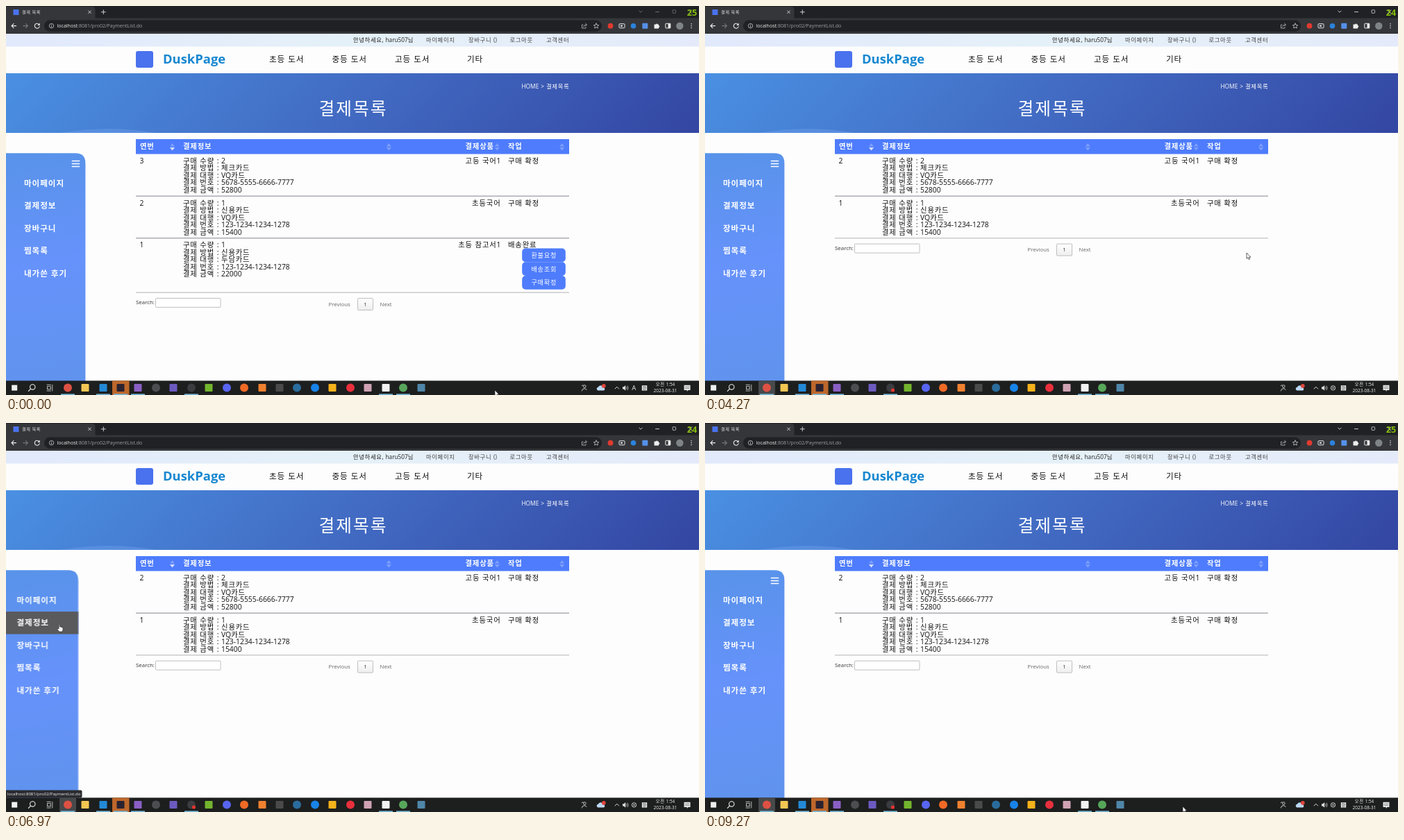
An HTML page for the animation above (9310 ms loop, 998 by 561 pixels).

```html
<!DOCTYPE html>
<html lang="ko">
<head>
<meta charset="utf-8">
<title>결제 목록</title>
<style>
html, body { margin: 0; width: 100%; height: 100%; overflow: hidden; background: #fdfdfd; }
svg { display: block; width: 100vw; height: 100vh; font-family: 'Open Sans', 'Noto Sans CJK KR', sans-serif; }
text { word-spacing: .09em; }
.k { font-family: 'Noto Sans CJK KR', sans-serif; letter-spacing: .08em; }
.line { fill: none; stroke-linecap: round; stroke-linejoin: round; }
.cursor { animation: move 9310ms linear infinite; }
.side { animation: slide 9310ms linear infinite; }
@keyframes move {
  0%, 5.9% { transform: translate(704px, 554px); }
  13.96%, 14.72% { transform: translate(771px, 422px); }
  20.41%, 25.78% { transform: translate(783px, 360px); }
  27.9%, 50.5% { transform: translate(780px, 356px); }
  61.2% { transform: translate(300px, 290px); }
  67.67%, 71% { transform: translate(100px, 285px); }
  78%, 82.17% { transform: translate(58px, 294px); }
  91.3% { transform: translate(268px, 88px); }
  98.3%, 100% { transform: translate(688px, 553px); }
}
@keyframes slide {
  0%, 67.13% { transform: none; }
  69.28%, 84.1% { transform: translate(-10.5px, 0); }
  86.25%, 100% { transform: none; }
}
</style>
</head>
<body>
<script>
const LOOP = 9310, CLICK = 1950, LOADED = 2400, ENTER = 6250, LEAVE = 7830;
const BLUE = '#4e7cfc';
const rules = new Map();

// Shows markup only between two times of the loop.
const on = (a, b, s) => {
  const id = `on${a}to${b}`, pc = t => (t / LOOP * 100).toFixed(3) + '%';
  rules.set(id, `@keyframes ${id}{0%{opacity:0}${pc(a)}{opacity:1}${pc(b)}{opacity:0}100%{opacity:0}}`);
  return `<g style="animation:${id} ${LOOP}ms step-end infinite">${s}</g>`;
};
const text = (x, y, size, s, fill = '#222', more = '') =>
  `<text x="${x}" y="${y}" font-size="${size}" fill="${fill}" ${more}>` +
  s.replace(/[가-힣]+/g, '<tspan class="k">$&</tspan>') + '</text>';
const rect = (x, y, w, h, fill, r = 0, more = '') =>
  `<rect x="${x}" y="${y}" width="${w}" height="${h}" rx="${r}" fill="${fill}" ${more}/>`;
const dot = (x, y, r, fill, more = '') => `<circle cx="${x}" cy="${y}" r="${r}" fill="${fill}" ${more}/>`;
const line = (d, color = '#ddd', w = 1) => `<path class="line" d="${d}" stroke="${color}" stroke-width="${w}"/>`;
const shape = (d, fill) => `<path d="${d}" fill="${fill}"/>`;
const MID = 'text-anchor="middle"', END = 'text-anchor="end"', BOLD = 'font-weight="700"';
const gradient = (id, box, stops) => `<linearGradient id="${id}" gradientUnits="userSpaceOnUse" ${box}>` +
  stops.map((c, i) => `<stop offset="${i / (stops.length - 1)}" stop-color="${c}"/>`).join('') + '</linearGradient>';

const defs = '<defs>' +
  gradient('top', 'x1="0" x2="998"', ['#e1e9fc', '#e5f1f8', '#e4eafa']) +
  gradient('banner', 'x1="228" y1="-131" x2="770" y2="411"', ['#4a90e2', '#426bc3', '#3346a2']) +
  gradient('menu', 'x1="0" y1="212" x2="60" y2="540"', ['#5893e9', '#6692fb', '#6093ee']) +
  gradient('page', 'x1="0" y1="421" x2="0" y2="439"', ['#ffffff', '#eeeeee']) +
  '<clipPath id="tab"><rect x="22" y="0" width="91" height="18"/></clipPath></defs>';

function browser() {
  const controls = c => line('M911.8 7L914 9.2 916.2 7M935.5 8.5H940.5', c, .9) +
    rect(960, 5.7, 4.6, 4.6, 'none', 1, `stroke="${c}" stroke-width=".8"`) +
    line('M982.8 5.8L988 11M988 5.8L982.8 11', c, .9);
  const reload = line('M47.6 26.6A3.5 3.5 0 1 0 48.2 29.6', '#e8e8e8', 1.1) + shape('M48.7 24.6V28H45.3Z', '#e8e8e8');
  const stop = line('M42 25.5L48 31.5M48 25.5L42 31.5', '#e8e8e8', 1.1);
  const title = text(23, 10.9, 6.2, '결제 목록', '#ddd');
  const mark = rect(10.5, 5, 8, 8, '#4a72ee');
  const globe = dot(14.5, 8.6, 3.7, '#8d9298');
  const loading = `<g clip-path="url(#tab)">${text(23, 10.9, 6.05, 'localhost:8081/pro02/PaymentList.do', '#ddd')}</g>`;
  return rect(0, 0, 998, 18, '#202124') + rect(0, 17.5, 998, 22.5, '#35363a') +
    shape('M0 18V1H124Q128.5 1 128.5 6V18Z', '#35363a') +
    on(0, CLICK, title + mark + reload + controls('#77797d')) +
    on(CLICK, LOOP, controls('#dadada')) +
    on(CLICK, LOADED, loading + globe + stop) +
    on(LOADED, LOOP, title + mark + reload) +
    line('M118.6 6.8L122.4 10.6M122.4 6.8L118.6 10.6M137.3 8.7H143.3M140.3 5.7V11.7', '#ddd', .9) +
    line('M14.6 28.6H8.2M11 25.6L8 28.6 11 31.6', '#eee', 1.1) +
    line('M24.8 28.6H31.2M28.4 25.6L31.4 28.6 28.4 31.6', '#75777b', 1.1) +
    rect(55, 20.5, 803, 16.5, '#202124', 8.2) +
    dot(65.5, 28.6, 3.2, 'none', 'stroke="#ccc" stroke-width=".8"') + line('M65.5 28.3V30.3M65.5 26.7V26.8', '#ccc', .8) +
    text(73.5, 31.2, 7.05, 'localhost<tspan fill="#9aa0a6">:8081/pro02/PaymentList.do</tspan>', '#eee') +
    line('M831 27H829.5V32H835V30.5M831.5 30Q832 27 836 27M834.5 25.2L836.5 27 834.5 28.8', '#bbb', .8) +
    line('M850 25L851.1 27.4 853.7 27.7 851.8 29.4 852.3 32 850 30.7 847.7 32 848.2 29.4 846.3 27.7 848.9 27.4Z', '#ccc', .8) +
    dot(870.5, 28.7, 3.9, '#e03a30') +
    rect(883, 25.7, 8, 6, 'none', 1, 'stroke="#e5e5e5"') + rect(885, 27.7, 3, 2, '#e5e5e5') +
    dot(903.5, 28.7, 3.8, '#2b83dc') + rect(916.3, 24.7, 8, 8, '#5590e8', 1) +
    shape('M933.5 26.5H936A1.3 1.3 0 0 1 938.5 26.5H940V28.2A1.3 1.3 0 0 1 940 30.8V32.5H933.5Z', '#eee') +
    rect(949.8, 25.3, 7, 6.6, 'none', .6, 'stroke="#eee"') + rect(953.5, 25.3, 3.3, 6.6, '#eee') +
    dot(970.3, 28.7, 5.2, '#7f8587') +
    [25.7, 28.6, 31.5].map(y => dot(987, y, .8, '#ddd')).join('');
}

function header() {
  const links = [[605, '마이페이지'], [666, '장바구니 ()'], [725.5, '로그아웃'], [778, '고객센터']];
  const nav = [[379, '초등 도서'], [469.5, '중등 도서'], [560, '고등 도서'], [664, '기타']];
  return rect(0, 40, 998, 18.5, 'url(#top)') +
    text(500, 52.3, 8.3, '안녕하세요, haru507님') +
    links.map(([x, s]) => text(x, 52.3, 8.3, s, '#444')).join('') +
    rect(187, 65, 25, 24, '#4a72ee', 3) +
    text(226, 83, 18.4, 'DuskPage', '#1787d0', BOLD) +
    nav.map(([x, s]) => text(x, 81, 11.6, s, '#111', 'font-weight="500"')).join('') +
    rect(0, 97, 998, 86, 'url(#banner)') +
    shape('M78 183Q150 171 216 183Z', 'rgba(120,165,240,.35)') +
    text(811.5, 119, 8.4, 'HOME &gt; 결제목록', '#fff', END) +
    text(500, 157, 24.7, '결제목록', '#fff', MID + ' font-weight="300"');
}

function sorter(x, down) {
  return shape(`M${x - 3.6} 202.6L${x} 198 ${x + 3.6} 202.6Z`, '#7d9ffc') +
    shape(`M${x - 3.6} 204L${x} 208.6 ${x + 3.6} 204Z`, down ? '#d5dffc' : '#7d9ffc');
}

function row(y, count, way, firm, number, price, item, state) {
  const info = ['구매 수량 : ' + count, '결제 방법 : ' + way, '결제 대행 : ' + firm,
    '결제 번호 : ' + number, '결제 금액 : ' + price];
  return info.map((s, i) => text(255, y + i * 10.45, 10.35, s, '#111')).join('') +
    text(712.5, y, 10.35, item, '#111', END) + text(723, y, 10.35, state, '#111');
}

function pager(dy) {
  return `<g transform="translate(0 ${dy})">` + rect(187, 412.7, 624, 1, '#b4b4b4') +
    text(187, 430.2, 7.9, 'Search:', '#333') +
    rect(215.5, 421.5, 93.5, 13, '#fff', 1, 'stroke="#b0b0b0" stroke-width=".8"') +
    text(464.5, 432.6, 7.85, 'Previous', '#666') +
    rect(506.5, 421.5, 22, 17, 'url(#page)', 1, 'stroke="#b0b0b0" stroke-width=".8"') +
    text(517.5, 432.6, 7.9, '1', '#333', MID) + text(538.5, 432.6, 7.85, 'Next', '#666') + '</g>';
}

function button(y, label, from, to) {
  const box = fill => rect(743.2, y, 62.6, 19.7, fill, 5);
  return box(BLUE) + on(from, to, box('#666663')) + text(774.8, y + 13.3, 9.2, label, '#fff', MID);
}

function table() {
  const heads = [[193, '연번'], [255, '결제정보'], [661.5, '결제상품'], [723, '작업']];
  const no = (y, n) => text(192.5, y, 10.35, n, '#111');
  const divider = y => rect(187, y, 624, 1, '#84848f');
  return rect(187, 192, 624, 21.5, BLUE) +
    heads.map(([x, s]) => text(x, 206.4, 10.35, s, '#fff', BOLD)).join('') +
    [239.5, 551.3, 707.3, 800.7].map((x, i) => sorter(x, !i)).join('') +
    row(227, 2, '체크카드', 'VQ카드', '5678-5555-6666-7777', 52800, '고등 국어1', '구매 확정') +
    divider(273.6) +
    row(287.7, 1, '신용카드', 'VQ카드', '123-1234-1234-1278', 15400, '초등국어', '구매 확정') +
    on(0, LOADED, no(227, '3') + no(287.7, '2') + no(348.4, '1') + divider(334.3) +
      row(348.4, 1, '신용카드', '두담카드', '123-1234-1234-1278', 22000, '초등 참고서1', '배송완료') +
      button(349.6, '환불요청', 1820, LOADED) + button(369.3, '배송조회', 1650, 1820) +
      button(389, '구매확정', 1480, 1650) + pager(0)) +
    on(LOADED, LOOP, no(227, '2') + no(287.7, '1') + pager(-78.4));
}

function sidebar() {
  const items = ['마이페이지', '결제정보', '장바구니', '찜목록', '내가쓴 후기'];
  const bars = line('M95.3 223.5H105.7M95.3 227.5H105.7M95.3 231.5H105.7', '#fff', 1.4);
  return '<g class="side">' + shape('M-20 212.3H100Q114.4 212.3 114.4 226.7V541H-20Z', 'url(#menu)') +
    on(ENTER, LEAVE, rect(-10, 272, 124.4, 32.5, '#5a5a5c')) +
    items.map((s, i) => text(26, 259.6 + i * 32.5, 11.6, s, '#fff', BOLD)).join('') +
    on(0, ENTER, bars) + on(8030, LOOP, bars) + '</g>' +
    on(7100, LEAVE, line('M0 231L3 233.3 7 228.6M0 223.8L1.6 225', '#fff', 1.6));
}

const bubble = (w, s) => rect(-3, 529.5, w + 3, 11, '#2b2c30', 2) + text(2, 537.2, 6.05, s, '#eee');

function taskbar() {
  const apps = ['89 c dd5144', '114 s f3c653', '140 s 2389d6', '165 s 2b2230', '190 s 8a5fc4', '216 c 4b4d50', '241 s 6d5ac0',
    '267 c 3b3c40', '292 s 73b52d', '318 c 5865f2', '343 c f06a25', '369 s f0812f', '394 s 4a4a4a', '419 c 2a6c9c', '445 c 1883e8',
    '470 s f5b21a', '496 c e8303c', '521 s cfa2b4', '547 s f2f2f2', '572 c 57a65a', '598 s 4f86a8'];
  const icon = a => {
    const [x, kind, c] = a.split(' ');
    return kind === 'c' ? dot(x, 550.6, 6, '#' + c) : rect(x - 5.5, 545.1, 11, 11, '#' + c, 1);
  };
  return rect(0, 540.4, 998, 20.6, '#1d1e1e') + on(CLICK, LOOP, rect(77, 540.4, 24, 20.6, '#47494a')) +
    rect(153, 540.4, 24.5, 20.6, '#bd672b') +
    [89, 140, 165, 190, 267, 547, 572].map(x => rect(x - 10, 559.4, 20, 1.6, '#76b9dc')).join('') +
    rect(8.2, 546.6, 8, 8, '#f0f0f0') +
    dot(38.3, 549.4, 3.7, 'none', 'stroke="#eee" stroke-width="1.1"') + line('M35.6 552.1L32.4 555.4', '#eee', 1.2) +
    rect(59.5, 548.7, 4.8, 4, 'none', 0, 'stroke="#ccc" stroke-width=".9"') +
    line('M59 546.3H64.5M59 555H64.5M66.8 546.3V555', '#ccc', .9) +
    apps.map(icon).join('') +
    on(550, LOOP, dot(270.5, 554, 2.6, '#e5342f')) +
    dot(833.3, 548.5, 1.8, 'none', 'stroke="#ddd" stroke-width=".9"') +
    line('M829.3 555Q829.7 551.6 833.2 551.7 835.4 551.8 836 553.5M829.2 547.6Q830.5 546 831.4 547', '#ddd', .9) +
    shape('M852.5 554.5A2.5 2.5 0 0 1 853 549.6 4 4 0 0 1 860.4 550 2.4 2.4 0 0 1 861 554.5Z', '#bcd8f2') +
    dot(860.8, 547.9, 2.8, '#e0463d') +
    line('M877 552L879.8 549.2 882.6 552') + shape('M888 549.3H889.7L892.2 547V554.8L889.7 552.5H888Z', '#ddd') +
    line('M893.7 549.4Q894.8 550.9 893.7 552.4M895.2 548Q897.2 550.9 895.2 553.8', '#ccc', .8) +
    on(0, LOADED, text(904.3, 554.3, 9.5, 'A', '#eee', MID)) +
    on(LOADED, LOOP, dot(904.5, 550.8, 3.2, 'none', 'stroke="#ddd" stroke-width=".9"') +
      line('M903.1 549.4L905.9 552.2M905.9 549.4L903.1 552.2', '#ddd', .9)) +
    rect(915.8, 547.2, 7.4, 7.4, '#e8e8e8') + text(919.7, 553.3, 6, '한', '#222', MID) +
    text(949.5, 548.3, 6.3, '오전 1:54', '#eee', MID) + text(949.5, 557.3, 6.5, '2023-08-31', '#eee', MID) +
    shape('M976.5 546.8H985.5V554H982.5L980.7 556V554H976.5Z', '#e5e5e5') +
    line('M978.3 549.2H983.7M978.3 551.4H983.7', '#555', .6);
}

function fps() {
  const spans = [[0, 930, 25], [930, 1930, 24], [1930, 2930, 25], [2930, 4930, 24],
    [4930, 6930, 25], [6930, 7930, 24], [7930, LOOP, 25]];
  return spans.map(([a, b, n]) => on(a, b, text(980.8, 14.2, 12.6, String(n), '#86bd0c', BOLD))).join('');
}

function cursor() {
  const outline = 'stroke="#222" stroke-width=".7" stroke-linejoin="round"';
  const arrow = `<path d="M0 0V8.4L2 6.7 3.3 9.6 4.6 9 3.3 6.2H5.9Z" fill="#fff" ${outline}/>`;
  const hand = `<path d="M-.8 .6Q0-.6 .8 .6V4Q1.7 3.4 2.3 4.3 3.3 3.9 3.8 4.7 5.2 4.4 5.2 5.8V8.2L4.4 11H-.2L-2.8 7.4Q-3.1 6-1.8 6.2L-.8 7.1Z" fill="#fff" ${outline}/>`;
  return '<g class="cursor">' +
    [[0, 1480], [LOADED, ENTER], [LEAVE, LOOP]].map(([a, b]) => on(a, b, arrow)).join('') +
    [[1480, LOADED], [ENTER, LEAVE]].map(([a, b]) => on(a, b, hand)).join('') + '</g>';
}

const scene = defs + rect(0, 0, 998, 561, '#fdfdfd') + header() + table() + sidebar() + browser() +
  on(1820, LOADED, bubble(139.5, 'localhost:8081/pro02/ReturnPayment.do?sno=2')) +
  on(ENTER, LEAVE, bubble(109.5, 'localhost:8081/pro02/PaymentList.do')) +
  taskbar() + fps() + cursor();
document.body.innerHTML = `<style>${[...rules.values()].join('')}</style>` +
  `<svg viewBox="0 0 998 561" xmlns="http://www.w3.org/2000/svg">${scene}</svg>`;
</script>
</body>
</html>
```
